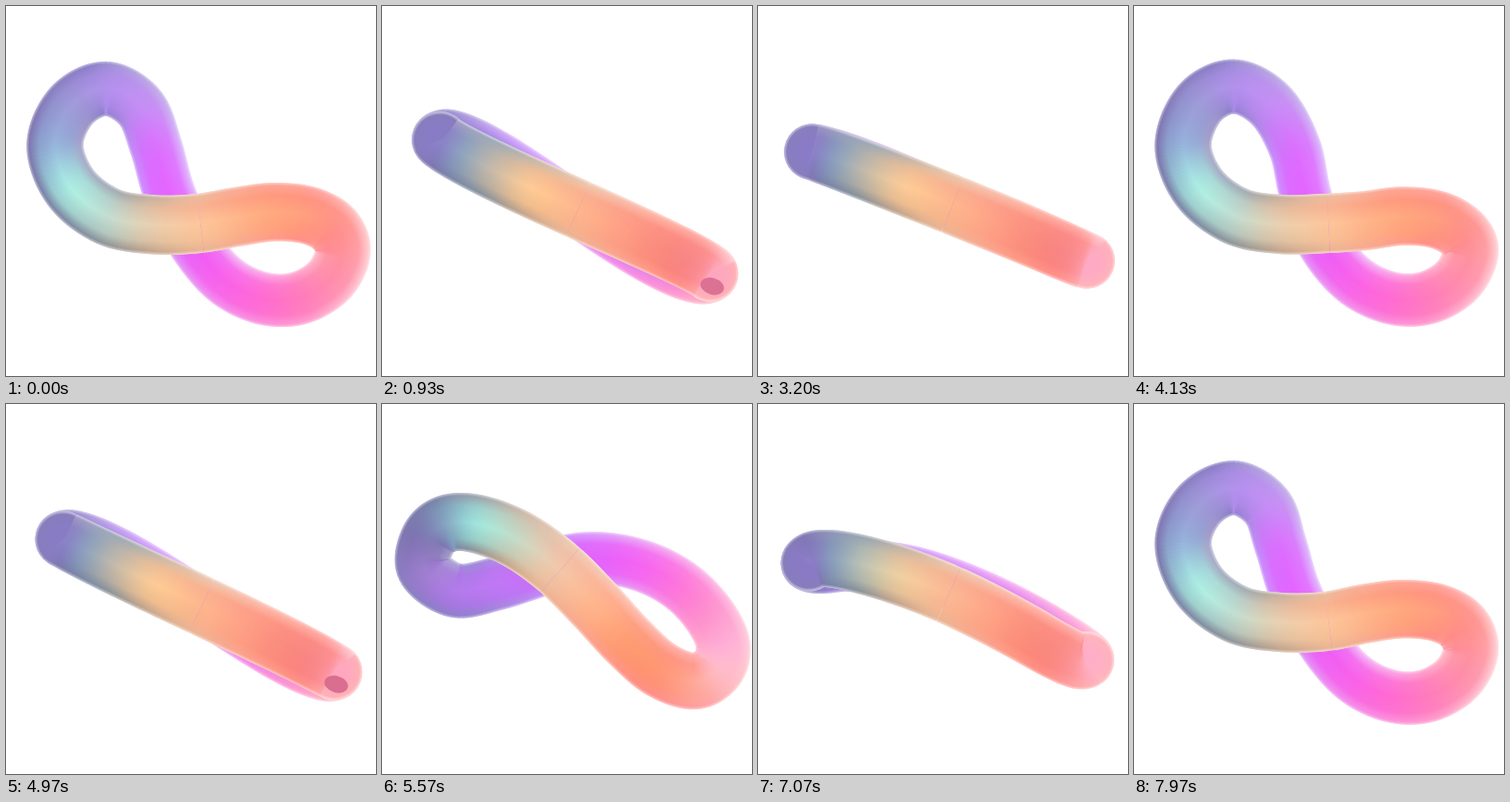
An HTML page with a canvas for the animation above (8.01 s loop, 400x400 px).

```html
<!DOCTYPE html>
<html lang="en">
<head>
<meta charset="utf-8">
<title>Twisting loop</title>
<style>
  html, body { margin: 0; width: 100%; height: 100%; overflow: hidden; background: #fff; }
  canvas { display: block; width: 100vw; height: 100vh; }
</style>
</head>
<body>
<canvas id="stage"></canvas>
<script>
const PERIOD = 4005, KNOTS = 20, STEPS = 14, N = KNOTS * STEPS;
const canvas = document.getElementById('stage');
const ctx = canvas.getContext('2d');
const { sin, cos, PI, max, min, hypot } = Math;

const clamp = (v, a, b) => max(a, min(b, v));
const mix = (a, b, k) => a.map((v, i) => v + (b[i] - v) * k);
const rgb = c => `rgb(${c.map(v => clamp(v, 0, 255) | 0).join()})`;
const palette = s => s.split(' ').map(h => [0, 2, 4].map(i => parseInt(h.substr(i, 2), 16)));
const angle = i => i / KNOTS * 2 * PI;

// Knot 0 is the left end, 5 the middle of the front strand,
// 10 the right end, 15 the middle of the back strand.
const openTones = palette(
  '9c96d8 92b0da a8ece2 c0ded0 e8cfae fcc498 ffb284 ffa478 ff987a ff8a84 ' +
  'ff8c98 ff84a8 ff72bc ff62d2 f858ea ea54fa e45cff da68fe c486f6 b08cec');
const flatTones = palette(
  '8a7cc8 8580c4 8da0ba c8b8a4 ffc890 ffb488 ff9c80 fa8678 f88080 fc8c98 ' +
  'ffa8c8 ff90c8 f080e0 d880f0 c070f0 b070f0 a870f0 a078e8 9878e0 9078d0');
const turnedTones = palette(
  '9a78cc 7c74b2 80a4c0 9ae4dc c0dcc8 f0c6a8 ffb286 ff996c ff946e ffa696 ' +
  'ffb8c6 ffaad4 ff8ecc ff72d6 fa5fec ec58fa dc5efc cc64fa c070f6 b074ea');
const rimTones = palette(
  '8a7fc0 7f78b0 7c86a8 8a939c c0a48e e8b494 f8a890 ff9a88 ff9088 ffa0a0 ' +
  'ffb4bc ffb0c8 ff9cd0 fa90e0 f090f0 e090f8 d48cff c48cf8 a888e0 9080cc');

const pairs = s => s.split(' ').map(p => p.split(',').map(Number));
const open = pairs(
  '71,107 53,150 70,196 110,227 158,236 207,235 250,229 290,224 328,228 355,243 ' +
  '364,267 349,297 315,316 275,315 235,294 201,252 179,203 165,152 145,109 108,89');
const turned = pairs(
  '33,218 38,184 60,160 95,150 140,156 185,179 225,215 258,252 292,285 328,299 ' +
  '353,284 361,254 349,218 324,184 290,162 248,155 204,165 160,192 114,219 68,237');

const pose = (points, tones) => points.map((p, i) => [...p, ...tones[i]]);
const shift = (points, fn) => points.map(([x, y], i) => {
  const [dx, dy] = fn(angle(i), i);
  return [x + dx, y + dy];
});
const wave = (a, m, c, s, c2) => m + c * cos(a) + s * sin(a) + c2 * cos(2 * a);

// Loop seen edge on, the back strand leaning a little off the axis.
function edgeOn(x0, y0, x1, y1, lean) {
  const len = hypot(x1 - x0, y1 - y0);
  const ux = (x1 - x0) / len, uy = (y1 - y0) / len;
  return Array.from({ length: KNOTS }, (_, i) => {
    const a = angle(i), f = (1 - cos(a)) / 2 * len;
    const lat = lean * sin(2 * a) * (sin(a) > 0 ? 0.2 : 1);
    return [x0 + ux * f - uy * lat, y0 + uy * f + ux * lat];
  });
}

// Slide of the open pose: back strand to the right, front strand down.
const drift = k => shift(open, (a, i) => [
  9 * k * Math.exp(-(((i - 16.7) / 1.1) ** 2)),
  i > 5 && i < 10 ? 3 * k : i > 17 || i === 0 ? -2 * k : 0
]);

const keys = [
  [-40, pose(drift(-0.8), openTones)],
  [125, pose(drift(1), openTones)],
  [950, pose(edgeOn(62, 145, 355, 290, 11), flatTones)],
  [1600, pose(shift(turned, a => [wave(a, 7, 1.5, 0.5, 3.5), wave(a, -7, -20, -7, -11)]), turnedTones)],
  [2165, pose(turned, turnedTones)],
  [2650, pose(shift(turned, a => [wave(a, 2, 5, 4.5, 3), 16 * sin(2 * a) - 2]), turnedTones)],
  [3230, pose(edgeOn(59, 155, 356, 275, 5), flatTones)]
];

function keyAt(i) {
  const n = keys.length, turn = Math.floor(i / n);
  const [t, p] = keys[i - turn * n];
  return { t: t + turn * PERIOD, p };
}

// Smooth cyclic blend through the keyed poses.
function poseAt(time) {
  let i = 0;
  while (keyAt(i + 1).t <= time) i++;
  const [a, b, c, d] = [-1, 0, 1, 2].map(k => keyAt(i + k));
  const h = c.t - b.t, u = (time - b.t) / h, u2 = u * u, u3 = u2 * u;
  const slope = (p, q, r, j, k) => {
    const h1 = q.t - p.t, h2 = r.t - q.t;
    const s1 = (q.p[j][k] - p.p[j][k]) / h1, s2 = (r.p[j][k] - q.p[j][k]) / h2;
    return (s1 * h2 + s2 * h1) / (h1 + h2);
  };
  return b.p.map((row, j) => row.map((v, k) =>
    (2 * u3 - 3 * u2 + 1) * v + (3 * u2 - 2 * u3) * c.p[j][k] +
    h * ((u3 - 2 * u2 + u) * slope(a, b, c, j, k) + (u3 - u2) * slope(b, c, d, j, k))));
}

// Closed Catmull-Rom spline through rows of any width.
function spline(rows) {
  const out = [], n = rows.length;
  for (let i = 0; i < n; i++) {
    const [a, b, c, d] = [n - 1, 0, 1, 2].map(k => rows[(i + k) % n]);
    for (let s = 0; s < STEPS; s++) {
      const u = s / STEPS;
      out.push(b.map((v, k) => v + 0.5 * u * (c[k] - a[k] +
        u * (2 * a[k] - 5 * v + 4 * c[k] - d[k] + u * (3 * (v - c[k]) + d[k] - a[k])))));
    }
  }
  return out;
}

const rims = spline(rimTones);
const WHITE = [255, 255, 255], RED = [255, 122, 112];
const wrap = k => (k % N + N) % N;

function buildTube(time) {
  const line = spline(poseAt(time));
  const tube = line.map((p, k) => {
    const q = line[wrap(k + 1)], o = line[wrap(k - 1)];
    const dx = q[0] - o[0], dy = q[1] - o[1], len = hypot(dx, dy) || 1;
    const a = k / N * 2 * PI;
    return {
      x: p[0], y: p[1], nx: dy / len, ny: -dx / len, len,
      r: 30.1 + 2 * sin(a), mid: p.slice(2), rim: rims[k],
      warm: max(0, sin(a - 0.9)) * (sin(a) > 0 ? 1 : 0)
    };
  });
  tube.forEach((p, k) => {
    const q = tube[wrap(k + 1)], o = tube[wrap(k - 1)];
    p.bend = ((q.nx - o.nx) * -p.ny + (q.ny - o.ny) * p.nx) / p.len;
  });
  return tube;
}

function tone(p, side) {
  const nx = p.nx * side, ny = p.ny * side;
  const spread = clamp((1 + side * p.r * p.bend) * 2.5, 0, 1);
  const light = clamp(nx * 0.8 - ny * 0.3, 0, 1) * 0.4;
  const rim = mix(p.mid, mix(p.rim, WHITE, light), spread);
  const body = mix(p.mid, RED, p.warm * max(0, -ny) ** 2 * 0.4);
  return { edge: mix(rim, WHITE, 0.5 * spread), rim, body: mix(body, rim, 0.3) };
}

function addStops(g, stops) {
  stops.forEach(([at, c]) => g.addColorStop(at, rgb(c)));
  return g;
}

// Round end where the line turns back on itself.
function cap(m) {
  ctx.fillStyle = addStops(ctx.createRadialGradient(m.x, m.y, 0, m.x, m.y, m.r), [
    [0, m.mid], [0.56, mix(m.mid, m.rim, 0.3)], [0.9, m.rim], [1, mix(m.rim, WHITE, 0.5)]]);
  ctx.beginPath();
  ctx.arc(m.x, m.y, m.r, 0, 2 * PI);
  ctx.fill();
}

function slice(tube, k, dir) {
  const p = tube[wrap(k)], q = tube[wrap(k + 2 * dir)], m = tube[wrap(k + dir)];
  if (p.nx * q.nx + p.ny * q.ny < 0.93) return cap(m);
  const lo = tone(m, -1), hi = tone(m, 1);
  ctx.fillStyle = addStops(ctx.createLinearGradient(
    m.x - m.nx * m.r, m.y - m.ny * m.r, m.x + m.nx * m.r, m.y + m.ny * m.r), [
    [0, lo.edge], [0.05, lo.rim], [0.22, lo.body], [0.5, mix(m.mid, WHITE, 0.05)],
    [0.78, hi.body], [0.95, hi.rim], [1, hi.edge]]);
  ctx.beginPath();
  ctx.moveTo(p.x - p.nx * p.r, p.y - p.ny * p.r);
  ctx.lineTo(p.x + p.nx * p.r, p.y + p.ny * p.r);
  ctx.lineTo(q.x + q.nx * q.r, q.y + q.ny * q.r);
  ctx.lineTo(q.x - q.nx * q.r, q.y - q.ny * q.r);
  ctx.fill();
}

// Dimple at the right end while the loop is edge on.
function dimple(time) {
  const alpha = Math.exp(-(((time - 955) / 80) ** 2));
  if (alpha < 0.02) return;
  ctx.globalAlpha = alpha * 0.9;
  ctx.fillStyle = '#d4668a';
  ctx.beginPath();
  ctx.ellipse(357, 303, 13, 9, 0.3, 0, 2 * PI);
  ctx.fill();
  ctx.globalAlpha = 1;
}

function draw(time) {
  const w = innerWidth, h = innerHeight, dpr = devicePixelRatio || 1;
  if (canvas.width !== w * dpr || canvas.height !== h * dpr) {
    canvas.width = w * dpr;
    canvas.height = h * dpr;
  }
  ctx.setTransform(canvas.width / 400, 0, 0, canvas.height / 400, 0, 0);
  ctx.fillStyle = '#fff';
  ctx.fillRect(0, 0, 400, 400);
  const tube = buildTube(time), back = N * 0.75;
  for (let j = 0; j < N / 2; j++) {
    slice(tube, back + j, 1);
    slice(tube, back + 2 - j, -1);
  }
  dimple(time);
}

const start = performance.now();
function frame() {
  draw((performance.now() - start) % PERIOD);
  requestAnimationFrame(frame);
}
frame();
</script>
</body>
</html>
```
